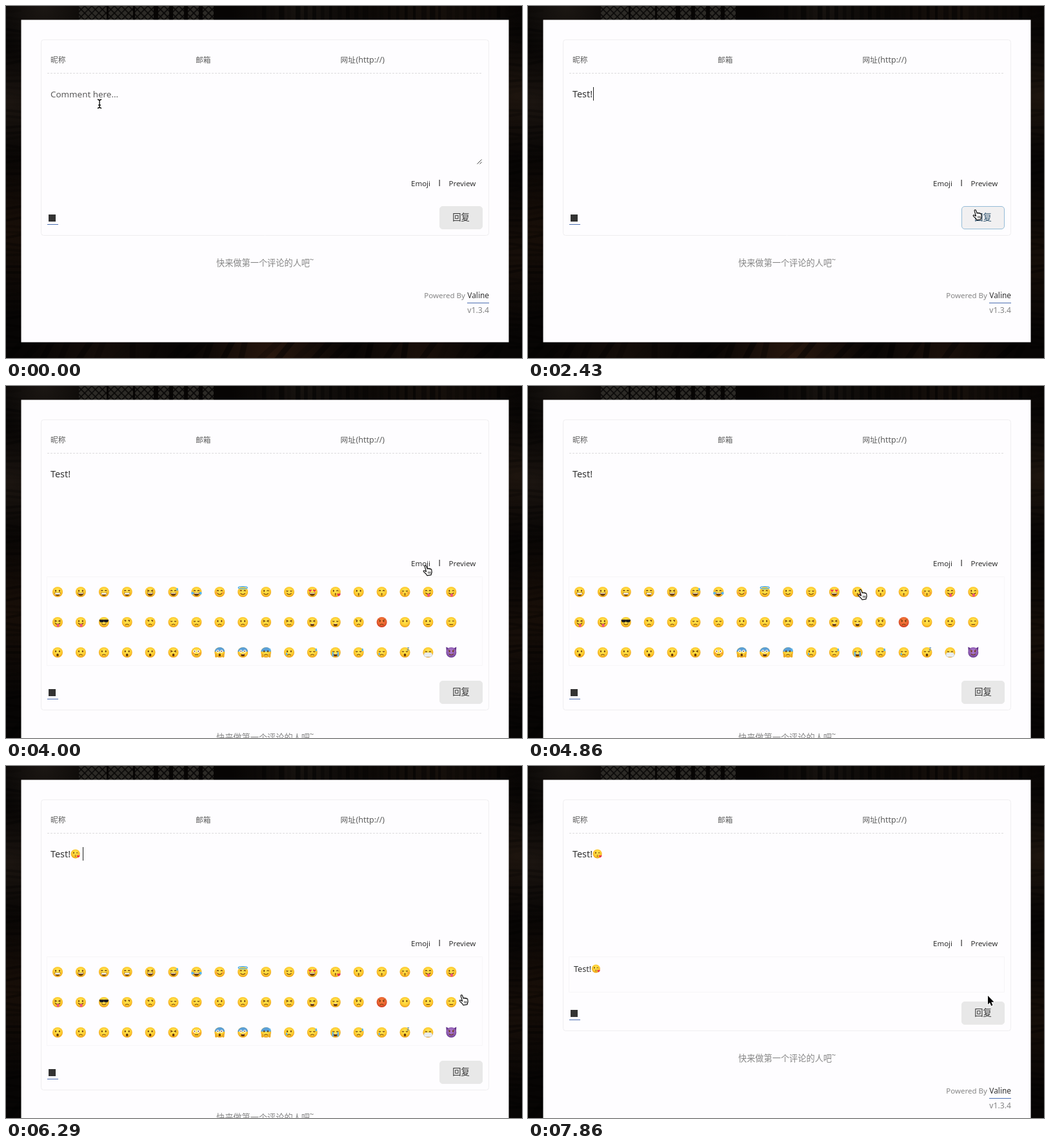
Animation, 800 px wide and 547 px high, one loop 8 s. Source, as an HTML page with a canvas:

```html
<!DOCTYPE html>
<html lang="zh-CN">
<head>
<meta charset="utf-8">
<title>Comment box</title>
<style>
html, body { margin: 0; width: 100%; height: 100%; overflow: hidden; background: #080706; }
canvas { display: block; width: 100vw; height: 100vh; }
</style>
</head>
<body>
<canvas id="stage" width="800" height="547"></canvas>
<script>
const canvas = document.getElementById('stage');
const ctx = canvas.getContext('2d');
const LOOP = 8000, STEP = 1000 / 7;
const LATIN = '"Noto Sans", "Open Sans", sans-serif';
const CJK = '"Noto Sans CJK SC", "Noto Sans CJK", sans-serif';
const PAPER = '#fefdff', INK = '#313131', GRAY = '#858585', HINT = '#5c5c5c', LINK = '#4a6cb0';

function rand(seed) {
  const v = Math.sin(seed * 127.1) * 43758.5453;
  return v - Math.floor(v);
}

function text(s, x, y, size, color, align = 'left', family = LATIN) {
  ctx.font = `${size}px ${family}`;
  ctx.fillStyle = color;
  ctx.textAlign = align;
  ctx.fillText(s, x, y);
}

function rect(x, y, w, h, color) {
  ctx.fillStyle = color;
  ctx.fillRect(x, y, w, h);
}

function box(x, y, w, h, r, fill, stroke) {
  ctx.beginPath();
  ctx.roundRect(x, y, w, h, r);
  if (fill) { ctx.fillStyle = fill; ctx.fill(); }
  if (stroke) { ctx.strokeStyle = stroke; ctx.lineWidth = 1; ctx.stroke(); }
}

function line(points, color, width = 1) {
  ctx.beginPath();
  points.forEach(([x, y], i) => i ? ctx.lineTo(x, y) : ctx.moveTo(x, y));
  ctx.strokeStyle = color;
  ctx.lineWidth = width;
  ctx.stroke();
}

function oval(x, y, rx, ry, color) {
  ctx.beginPath();
  ctx.ellipse(x, y, rx, ry, 0, 0, 7);
  ctx.fillStyle = color;
  ctx.fill();
}

// bend > 0 sags like a smile, < 0 arches
function curve(x, y, half, bend, color, width = 1.1) {
  ctx.beginPath();
  ctx.moveTo(x - half, y);
  ctx.quadraticCurveTo(x, y + bend, x + half, y);
  ctx.strokeStyle = color;
  ctx.lineWidth = width;
  ctx.stroke();
}

const mix = (a, b, k) => `rgb(${a.map((v, i) => Math.round(v + (b[i] - v) * k))})`;
const clamp = v => Math.max(0, Math.min(1, v));

function haze(x, y, r, rgb, alpha) {
  const g = ctx.createRadialGradient(x, y, 0, x, y, r);
  g.addColorStop(0, `rgba(${rgb}, ${alpha})`);
  g.addColorStop(1, `rgba(${rgb}, 0)`);
  rect(x - r, y - r, 2 * r, 2 * r, g);
}

function leadedWindow(x, w) {
  ctx.save();
  ctx.beginPath();
  ctx.rect(x, 0, w, 22);
  ctx.clip();
  rect(x, 0, w, 22, '#2c2a26');
  for (let i = x - 24; i < x + w; i += 11) {
    line([[i, 0], [i + 22, 22]], '#0c0b0a', 1.6);
    line([[i + 22, 0], [i, 22]], '#0c0b0a', 1.6);
  }
  ctx.restore();
}

// dim room behind the card
function drawRoom() {
  rect(0, 0, 800, 547, '#070504');
  haze(60, 0, 90, '72, 62, 52', 0.32);
  haze(460, 0, 110, '66, 56, 46', 0.28);
  haze(660, 0, 150, '70, 50, 34', 0.26);
  haze(8, 150, 90, '70, 54, 42', 0.32);
  haze(8, 350, 130, '78, 44, 20', 0.24);
  haze(792, 140, 100, '78, 54, 36', 0.32);
  haze(792, 390, 120, '74, 44, 24', 0.24);
  haze(410, 545, 130, '104, 58, 32', 0.34);
  haze(640, 545, 110, '84, 48, 28', 0.26);
  haze(150, 545, 120, '76, 46, 28', 0.2);
  for (let x = 384; x < 780; x += 13) {
    rect(x, 0, 4 + 5 * rand(x), 22, `rgba(0, 0, 0, ${0.6 * rand(x + 3)})`);
  }
  leadedWindow(113, 43);
  leadedWindow(159, 38);
  leadedWindow(200, 29);
  for (let x = 236; x < 328; x += 23) leadedWindow(x, 17);
  for (let i = 0; i < 60; i++) {
    const y = i * 9, shade = 0.35 * rand(i + 20);
    line([[0, y], [24, y + 10 * rand(i) - 5]], `rgba(0, 0, 0, ${shade})`, 4);
    line([[779, y], [800, y + 10 * rand(i + 8) - 5]], `rgba(0, 0, 0, ${shade})`, 4);
  }
  for (let x = 0; x < 800; x += 28) {
    line([[x, 550], [x + 34 * rand(x + 2), 520]], `rgba(0, 0, 0, ${0.55 * rand(x + 6)})`, 9);
  }
}

const room = (() => {
  drawRoom();
  const copy = document.createElement('canvas');
  copy.width = 800;
  copy.height = 547;
  copy.getContext('2d').drawImage(canvas, 0, 0);
  return copy;
})();

// each face: eyes, mouth, extras
const FACES = [
  'oG oD nG nG xD nDs nDj nUb nUa wU cU hD wkh ok nk ckb nt wt',
  'xt ot gU df df cf cf of of xf xw xF cF vf vfr o_ o- --',
  'oO of of oO oO xO S-b SOlk SFl oflsk oft cfs cFT cfs cft cOz cm vUp'
].map(row => row.split(' '));
const BROWN = '#6b3a0b', BLUE = '#58b4ee', RED = '#e8354b';

function heart(x, y, s) {
  ctx.beginPath();
  ctx.moveTo(x, y + s);
  ctx.bezierCurveTo(x - 2 * s, y - s * 0.3, x - s * 0.8, y - 1.6 * s, x, y - s * 0.4);
  ctx.bezierCurveTo(x + s * 0.8, y - 1.6 * s, x + 2 * s, y - s * 0.3, x, y + s);
  ctx.fillStyle = RED;
  ctx.fill();
}

function drawEye(kind, side) {
  const x = side * 2.9, y = -1.8;
  switch (kind) {
    case 'o': oval(x, y, 1, 1.5, BROWN); break;
    case 'n': curve(x, y + 0.6, 1.5, -2.4, BROWN); break;
    case 'c': curve(x, y, 1.5, 1.8, BROWN); break;
    case 'x': line([[x + side * 1.6, y - 1.3], [x - side * 1.2, y], [x + side * 1.6, y + 1.3]], BROWN, 1.1); break;
    case 'w': side < 0 ? oval(x, y, 1, 1.5, BROWN) : curve(x, y + 0.5, 1.6, -2, BROWN); break;
    case 'h': heart(x * 1.15, y - 0.2, 2); break;
    case 'g': oval(side * 3.3, y, 3.3, 2.2, '#222'); rect(-7, -3.6, 14, 1.2, '#222'); break;
    case 'd': curve(x, y - 1, 1.5, 0, BROWN); oval(x + 0.6, y, 0.9, 0.9, BROWN); break;
    case 'v': oval(x, y + 0.4, 1, 1.2, BROWN); line([[x + side * 1.8, y - 2], [x - side * 1.5, y - 0.6]], BROWN, 1); break;
    case 'S': oval(x, y, 2.2, 2.2, '#fff'); oval(x, y, 0.9, 0.9, BROWN); break;
    case '-': line([[x - 1.6, y], [x + 1.6, y]], BROWN, 1.1);
  }
}

function drawMouth(kind) {
  if ('DG'.includes(kind)) {
    ctx.beginPath();
    ctx.moveTo(-4.8, 1);
    ctx.quadraticCurveTo(0, 2, 4.8, 1);
    ctx.quadraticCurveTo(4, 6, 0, 6);
    ctx.quadraticCurveTo(-4, 6, -4.8, 1);
    ctx.fillStyle = BROWN;
    ctx.fill();
    rect(-3.9, 1.7, 7.8, kind === 'G' ? 2.2 : 1.1, '#fff');
  } else if (kind === 'U') curve(0, 2.2, 3.6, 3.6, BROWN);
  else if (kind === 'f') curve(0, 4.4, 2.7, -2.8, BROWN);
  else if (kind === 'k') { curve(0, 2, 0.7, 2, BROWN); curve(0, 4, 0.7, 2, BROWN); }
  else if (kind === 't') { curve(0, 1.6, 4, 3.6, BROWN, 1.4); oval(0.7, 5, 2.1, 2.5, '#ee5681'); }
  else if (kind === 'O') oval(0, 3.9, 1.8, 2.2, BROWN);
  else if (kind === 'F') { oval(0, 3.9, 3, 2, BROWN); rect(-2, 2.2, 4, 0.8, '#fff'); }
  else if (kind === '-') line([[-2.8, 3.6], [2.8, 3.6]], BROWN, 1.1);
  else if (kind === 'w') line([[-3.4, 4.5], [-1.7, 3.3], [0, 4.5], [1.7, 3.3], [3.4, 4.5]], BROWN, 1);
  else if (kind === 'm') { box(-6.2, 0.8, 12.4, 5.8, 2.5, '#f3f5f7', '#ccd5dd'); curve(0, 3.5, 5, 1, '#ccd5dd', 0.7); }
}

const EXTRAS = {
  s: () => oval(6, -4, 1.3, 2.2, BLUE),
  j: () => [-6.3, 6.3].forEach(x => oval(x, 2, 1.9, 2.3, BLUE)),
  a: () => {
    ctx.beginPath();
    ctx.ellipse(0, -6.5, 7, 1.7, 0, 0, 7);
    ctx.strokeStyle = '#4ba9e4';
    ctx.lineWidth = 1.4;
    ctx.stroke();
  },
  b: () => [-4.9, 4.9].forEach(x => oval(x, 1.4, 1.8, 1.2, 'rgba(245, 95, 70, .45)')),
  h: () => heart(5.2, 4.3, 2.4),
  t: () => oval(-3.9, 2.6, 1.2, 2, BLUE),
  T: () => [-4, 4].forEach(x => rect(x - 1.1, -0.6, 2.2, 7, BLUE)),
  k: () => [-5.6, 5.6].forEach(x => oval(x, 5, 1.7, 3, '#ecaa22')),
  z: () => text('z', 3, -3, 8, '#3978b5')
};

function face(code, x, y, r) {
  const [eye, mouth, ...extras] = code;
  ctx.save();
  ctx.translate(x, y);
  ctx.scale(r / 8, r / 8);
  const [light, mid, dark] = extras.includes('r') ? ['#f4793c', '#e8612f', '#c42c1a']
    : extras.includes('p') ? ['#a975c9', '#8f5cb2', '#5f2f87'] : ['#ffe34c', '#fdc92f', '#e8930f'];
  const glow = ctx.createRadialGradient(0, -2, 2, 0, -1, 9.4);
  glow.addColorStop(0, light);
  glow.addColorStop(0.6, mid);
  glow.addColorStop(1, dark);
  if (extras.includes('p')) {
    [-1, 1].forEach(s => {
      ctx.beginPath();
      ctx.moveTo(s * 3, -6);
      ctx.lineTo(s * 8, -8.5);
      ctx.lineTo(s * 7.5, -2);
      ctx.fillStyle = dark;
      ctx.fill();
    });
  }
  oval(0, 0, 8, 8, glow);
  if (extras.includes('l')) {
    ctx.beginPath();
    ctx.arc(0, 0, 8, Math.PI * 1.05, Math.PI * 1.95);
    ctx.fillStyle = '#5b9fd6';
    ctx.fill();
  }
  drawEye(eye, -1);
  drawEye(eye, 1);
  drawMouth(mouth);
  extras.forEach(e => EXTRAS[e] && EXTRAS[e]());
  ctx.restore();
}

// pointer stops: time, x, y
const STOPS = [
  [0, 145, 152], [1480, 145, 152], [2270, 694, 314], [2430, 693, 316.5],
  [3140, 688, 319.5], [3260, 688, 319.5], [3760, 650, 278.5], [4060, 650, 278.5],
  [4830, 515, 316], [5160, 515, 316], [6250, 706, 355.5], [6340, 706, 355.5],
  [6880, 706, 273], [7560, 706, 273], [7850, 713, 357], [8000, 713, 357]
];

function pointerAt(t) {
  const i = STOPS.findIndex((s, n) => n && t < s[0]);
  const [t0, x0, y0] = STOPS[i - 1], [t1, x1, y1] = STOPS[i];
  let k = (t - t0) / (t1 - t0);
  k = k * k * (3 - 2 * k);
  return [x0 + (x1 - x0) * k, y0 + (y1 - y0) * k];
}

const ARROW = new Path2D('M0 0V13.4L3 10.5L5.2 15.8L7.4 14.8L5.3 9.8H9.4Z');
const HAND = new Path2D('M5 10.4L2.7 2.5C2.3 .7 4.4 .1 5 1.7L6.8 6.3C7.2 4.9 9 5 9.2 6.4C9.8 5.3 11.2 5.5 11.4 6.8C12.1 6 13.2 6.5 13.3 7.7L13.7 11.2C13.7 13 12.6 13.6 12.6 15.6L6.4 16.6C6 14.6 3.4 13 1 10.6C.1 9.3 1.6 8.4 2.8 9.2Z');
const BEAM = [[[-3, -7], [0, -5.5], [3, -7]], [[0, -6], [0, 6]], [[-3, 7], [0, 5.5], [3, 7]], [[-2, 2], [2, 2]]];

function drawPointer(t, mode) {
  const [x, y] = pointerAt(t);
  const labels = y > 266 && y < 284 && x > 626;
  const hand = mode === 1 || labels || (mode === 0 && y > 311 && x > 672);
  ctx.save();
  ctx.translate(x, y);
  ctx.lineJoin = 'round';
  if (y < 249) {
    // typing hides the text pointer
    if (t < 280 || t > 1500) {
      BEAM.forEach(p => line(p, '#fff', 3));
      BEAM.forEach(p => line(p, '#111', 1.4));
    }
  } else if (hand) {
    ctx.translate(-3.5, -0.5);
    ctx.fillStyle = '#fff';
    ctx.fill(HAND);
    ctx.strokeStyle = '#111';
    ctx.lineWidth = 1.2;
    ctx.stroke(HAND);
    [8, 9.7, 11.4].forEach(fx => line([[fx, 10.4], [fx + 0.3, 13.6]], '#222', 0.8));
  } else {
    ctx.strokeStyle = '#fff';
    ctx.lineWidth = 2;
    ctx.stroke(ARROW);
    ctx.fillStyle = '#000';
    ctx.fill(ARROW);
  }
  ctx.restore();
}

function drawButton(t, y) {
  const h = clamp((t - 2250) / 450) - clamp((t - 3300) / 400);
  const focus = t > 2700 && t < 3400;
  box(672.5, y + 0.5, 66, 35, 4.5, mix([232, 232, 232], [254, 253, 255], h),
    mix([232, 232, 232], [24, 120, 190], h));
  if (focus) {
    ctx.setLineDash([1, 1]);
    box(672.5, y + 0.5, 66, 35, 4.5, null, '#0f4f86');
    ctx.setLineDash([]);
  }
  text('回复', 705.5, y + 22.2, 13.3, mix([49, 49, 49], [24, 120, 190], h), 'center', CJK);
}

function drawForm(t, mode) {
  const dy = [0, 146.5, 55][mode];
  rect(23.5, 21.5, 756, 501 + dy, PAPER);
  box(54.5, 52.5, 694, Math.round(304 + dy), 4, null, '#efeef0');

  text('昵称', 69, 88.2, 11.7, HINT, 'left', CJK);
  text('邮箱', 294, 88.2, 11.7, HINT, 'left', CJK);
  text('网址', 518.5, 88.2, 11.7, HINT, 'left', CJK);
  text('(http://)', 542.5, 87.6, 12.5, HINT);
  ctx.setLineDash([3, 2]);
  [64, 289, 514].forEach(x => line([[x, 104.5], [x + 225, 104.5]], '#dcdbdd'));
  ctx.setLineDash([]);

  // typed comment
  const count = t < 280 ? 0 : t < 900 ? Math.min(4, Math.floor((t - 280) / STEP) + 1) : 5;
  const typed = 'Test!'.slice(0, count);
  const hasFace = t >= 4990;
  if (count) text(typed, 69, 142, 14.4, INK);
  else {
    text('Comment here...', 69, 142, 13.4, HINT);
    line([[730.5, 245.5], [737.5, 238.5]], '#444');
    line([[734.5, 245.5], [737.5, 242.5]], '#444');
  }
  if (hasFace) face('wkh', 107.6, 136.5, 7);
  const editing = (t > 130 && t < 2700) || (t > 4990 && t < 6990);
  if (editing && (t < 1000 || t % 1000 < 495)) {
    const x = hasFace ? 119 : count === 5 ? 101 : count ? 70 + ctx.measureText(typed).width : 69;
    rect(Math.round(x), 126, 1, 21, '#222');
  }

  text('Emoji', 628, 279.8, 11.5, INK);
  rect(671.5, 270, 1.2, 10, INK);
  text('Preview', 686.5, 279.8, 11.5, INK);

  if (mode === 1) {
    box(63.5, 296.5, 675, 138, 0, null, '#f7f6f8');
    FACES.forEach((row, j) => row.forEach((code, i) => face(code, 80 + i * 35.9, 320 + j * 47, 8)));
  } else if (mode === 2) {
    box(63.5, 296.5, 675, 55, 0, null, '#f6f5f7');
    text('Test!', 71, 319.5, 12.6, INK);
    face('wkh', 105.3, 315, 6.5);
  }

  const low = Math.round(dy);
  rect(66, 324 + low, 11, 11, '#333');
  rect(64, 339 + low, 17, 1, LINK);
  drawButton(t, 311 + low);

  text('快来做第一个评论的人吧', 326, 404 + low, 13.2, GRAY, 'left', CJK);
  text('~', 470.5, 399 + low, 12, GRAY);
  text('Powered By', 648.3, 454 + low, 11.5, GRAY);
  text('Valine', 749, 454 + low, 11.9, INK, 'right');
  rect(715, 461 + low, 34, 1, LINK);
  text('v1.3.4', 749, 477.4 + low, 12.2, GRAY, 'right');
}

function draw(now) {
  const t = Math.floor(((now % LOOP) + 6) / STEP) * STEP % LOOP;
  const mode = t < 3850 ? 0 : t < 6990 ? 1 : 2;
  ctx.drawImage(room, 0, 0);
  drawForm(t, mode);
  drawPointer(t, mode);
}

const start = performance.now();
function tick() {
  draw(performance.now() - start);
  requestAnimationFrame(tick);
}
tick();
</script>
</body>
</html>
```
